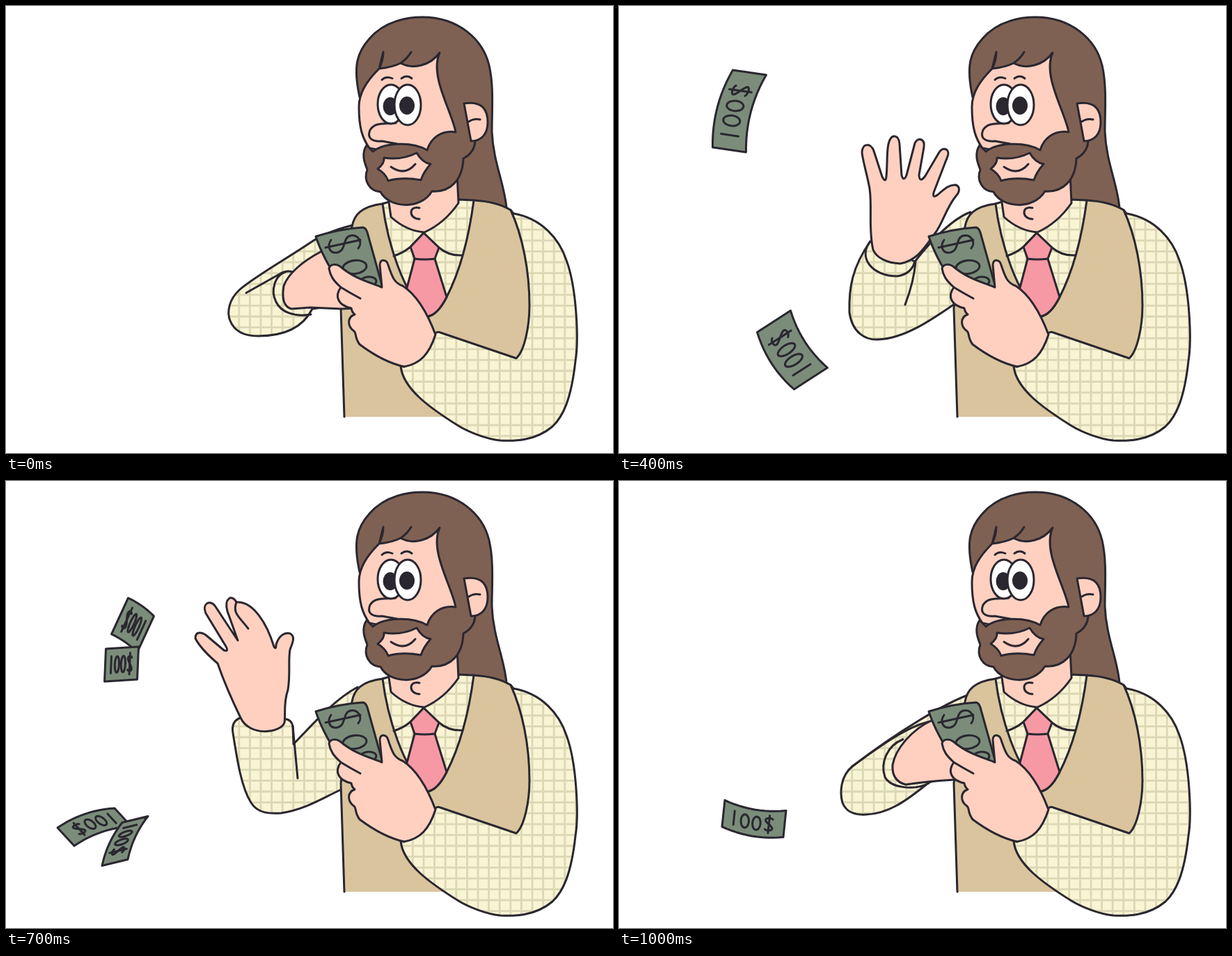
These frames come from a looping animation (872x642 px, 1.1 s). An HTML page with a canvas:

```html
<!DOCTYPE html>
<html lang="en">
<head>
<meta charset="utf-8">
<title>Throwing cash</title>
<style>
html, body { margin: 0; width: 100%; height: 100%; overflow: hidden; background: #fff; }
canvas { display: block; }
</style>
</head>
<body>
<canvas id="stage" width="872" height="642"></canvas>
<script>
const ctx = document.getElementById('stage').getContext('2d');
const INK = '#2a2730', SKIN = '#ffd0c0', HAIR = '#7f6153', VEST = '#d9c49d',
      SHIRT = '#f9f4d4', CHECK = '#dcd7b4', TIE = '#f799a4', CASH = '#7b8d7a';
const STEP = 100, STEPS = 11;

function fill(d, color) {
  ctx.fillStyle = color;
  ctx.fill(new Path2D(d));
}

function line(d, width = 3) {
  ctx.strokeStyle = INK;
  ctx.lineWidth = width;
  ctx.stroke(new Path2D(d));
}

function shape(d, color) {
  fill(d, color);
  line(d);
}

function oval(x, y, rx, ry, color, turn = 0) {
  ctx.beginPath();
  ctx.ellipse(x, y, rx, ry, turn, 0, 7);
  if (color) {
    ctx.fillStyle = color;
    ctx.fill();
  }
  ctx.strokeStyle = INK;
  ctx.lineWidth = 3;
  ctx.stroke();
}

// Checked shirt cloth
function cloth(d) {
  fill(d, SHIRT);
  ctx.save();
  ctx.clip(new Path2D(d));
  ctx.beginPath();
  for (let k = 0; k < 36; k++) {
    const x = 288 + 15.6 * k, y = 274.4 + 15.6 * k;
    ctx.moveTo(x, 260);
    ctx.lineTo(x, 642);
    ctx.moveTo(280, y);
    ctx.lineTo(840, y);
  }
  ctx.strokeStyle = CHECK;
  ctx.lineWidth = 2.8;
  ctx.stroke();
  ctx.restore();
  line(d);
}

function sample(n, point) {
  return Array.from({ length: n + 1 }, (_, i) => point(i / n));
}

// Flying note: centre, reading vector, downward vector, bend and taper
function note([cx, cy, ux, uy, vx, vy, bend = 0, taper = 0]) {
  const len = Math.hypot(ux, uy);
  const at = ([u, v]) => {
    const a = u - 0.5, b = (v - 0.5) * (1 - taper * u);
    const k = bend * (1 - 4 * a * a) / len;
    return [cx + a * ux + b * vx - uy * k, cy + a * uy + b * vy + ux * k];
  };
  const trace = points => 'M' + points.map(at).join('L');
  const edge = [...sample(12, t => [t, 0]), ...sample(12, t => [1 - t, 1])];
  shape(trace(edge) + 'Z', CASH);
  line(trace([[.18, .24], [.18, .76]]));
  for (const u of [.36, .55]) {
    line(trace(sample(18, t => [u + .065 * Math.cos(t * 2 * Math.PI), .5 + .25 * Math.sin(t * 2 * Math.PI)])));
  }
  line(trace(sample(20, t => {
    const a = (t - 0.5) * 4.4;
    return [.75 + .06 * Math.sin(2 * a), .5 + .23 * Math.sin(a)];
  })));
  line(trace([[.75, .17], [.75, .83]]));
}

// Note held upright in a hand
function heldNote() {
  shape('M445 331Q480 320 513 318Q517 319 519 325L541 404L482 402Q455 362 445 331Z', CASH);
  line('M467 336C460 346 466 356 476 354C489 351 483 334 494 330C506 327 513 340 506 348M459 347L509 336');
  oval(501, 375, 17, 9.5, null, -.12);
  oval(520, 396, 12, 7, null, -.12);
}

const reach = {
  sleeve: 'M497 315C470 322 452 330 440 338C400 365 355 390 335 408C320 422 317 440 322 452C330 472 350 474 362 474C395 474 425 465 440 435L490 428Z',
  folds: 'M345 412L393 385Q403 379 412 382M405 381C385 385 380 410 388 425C395 440 415 447 438 443',
  hand: 'M454 352C425 367 405 385 399 402C396 420 399 432 410 435L437 433Q460 434 482 435L502 434L502 350Z'
};
const back = {
  sleeve: 'M505 306C470 318 400 360 335 410C318 424 317 448 321 462C327 477 340 480 355 479C385 478 410 462 445 433L490 420Z',
  folds: 'M335 410C385 373 420 350 449 345M408 371C385 380 375 405 382 425C390 441 425 445 445 434',
  hand: 'M451 343C420 357 397 385 393 408C392 425 400 433 412 436Q445 431 482 429L502 428L502 345Z'
};
const draw = {
  sleeve: 'M413 352C375 368 330 405 324 430C320 455 340 467 360 467C400 467 450 438 481 430L500 400L500 330L470 330Z',
  folds: 'M402 356C402 382 415 405 449 397M451 396Q432 424 408 443',
  hand: 'M442 317C418 335 403 360 415 380C430 395 455 395 475 392L500 392L523 333C538 329 538 312 526 313L512 317L509 310C522 306 522 294 512 293L500 297Z'
};
const open = {
  sleeve: 'M505 296C480 305 450 335 425 367L361 338C335 375 330 405 331 440C335 470 355 480 372 479C410 478 450 450 482 428L500 420Z',
  folds: 'M361 338C343 360 362 388 400 388Q420 385 425 367M426 367Q424 395 411 429',
  hand: 'M365 350C358 320 364 290 360 262C356 240 350 222 349 210C350 196 362 197 366 208L378 245Q383 255 384 245C386 225 384 205 388 195C392 183 402 185 403 198L406 243Q409 253 413 243L425 197C429 188 440 190 438 203L431 243Q432 255 440 244L460 210C466 201 476 206 472 216L452 268Q450 277 458 271C468 262 475 256 484 257C491 260 489 268 484 273C470 290 465 312 455 325C440 345 430 365 404 370C385 369 370 362 365 350Z'
};
const lower = {
  ...open,
  folds: 'M361 342C344 362 370 379 400 379Q420 378 425 368M426 368Q424 395 411 430'
};
const wave = {
  sleeve: 'M505 296C470 312 440 345 421 372L417 350L352 336C340 345 338 370 340 390C344 420 347 450 352 463C358 478 370 478 385 477C420 475 450 458 482 441L500 430Z',
  folds: 'M417 350Q422 360 421 375L418 432',
  hand: 'M355 335C345 310 340 280 339 257C336 240 324 220 321 210C320 198 330 194 337 204L352 243Q359 250 358 240L351 187C350 170 364 167 367 180L380 230Q385 238 386 228L385 185C388 173 398 172 402 182C415 200 423 225 428 243Q429 252 437 246C445 238 452 237 457 238C463 242 459 252 454 258C447 270 447 290 445 305C438 330 420 350 414 365C400 375 375 378 355 335Z',
  finger: 'M404 242L403 215C400 200 396 192 401 183'
};
const fling = {
  sleeve: 'M505 296C470 315 440 350 413 378L412 352Q410 343 402 342L337 340Q323 345 326 362C332 400 338 440 352 462C362 478 380 478 395 477C430 472 455 455 482 443L500 430Z',
  folds: 'M412 352L419 427',
  hand: 'M337 340C320 305 312 285 304 262C290 250 278 238 272 226C272 214 283 218 288 222L313 243Q321 246 315 236L287 190C281 176 293 170 300 179L333 229L318 187C313 168 325 162 331 174C355 172 375 205 385 238Q388 243 388 235C392 222 400 217 408 219C416 223 412 232 408 242C405 260 409 275 405 300C398 320 402 335 400 347C395 362 350 368 337 340Z',
  finger: 'M331 174C325 190 335 195 348 212'
};

// Each step: arm pose, arm shift, notes in the air
const steps = [
  { arm: reach },
  { arm: draw, shift: [18, 14], pulls: true },
  { arm: draw, pulls: true },
  { arm: open, shift: [10, -3], notes: [
    [262, 190, 45, -95, 44, 20, -6], [318, 440, -70, -60, 34, -42, -5]] },
  { arm: open, notes: [
    [173, 151, 29, -111, 48, 7, -8], [249, 494, -53, -82, 48, -31, -7]] },
  { arm: wave, notes: [
    [127, 153, 10, 105, -20, -23, 8, .95], [80, 248, 53, 31, -39, 20, -2],
    [144, 505, -48, 62, -46, -7, 4]] },
  { arm: fling, shift: [22, 2], notes: [
    [145, 160, 20, 70, -35, -10, 5], [110, 258, 60, 10, -12, 40, -3],
    [116, 504, -72, 40, -32, -16, 3]] },
  { arm: fling, notes: [
    [182, 207, -37, -26, 24, -52, 2], [166, 263, 47, -3, -2, 47],
    [127, 497, -82, 28, -24, -26, 6], [171, 517, -29, 62, -37, 9, 4]] },
  { arm: lower, shift: [1, 0], notes: [
    [204, 307, 55, -72, 36, 22, 9], [106, 358, 31, 62, -28, 17, 8],
    [113, 548, 25, 49, -29, 3, 6], [187, 547, 46, -48, 21, 20, 7]] },
  { arm: draw, shift: [12, 14], notes: [
    [212, 398, 70, -30, 15, 36, 5], [125, 440, 60, 50, -20, 24, 5],
    [160, 552, 60, -10, 5, 22, 4]] },
  { arm: back, notes: [[194, 485, 88, 15, -4, 38, 6]] }
];

function head() {
  shape('M508 131C498 85 505 66 522 47C545 20 580 16 598 16C650 16 685 48 694 85C701 115 698 150 698 180C700 225 716 255 719 290L640 290L600 180Z', HAIR);
  shape('M542 66Q542 78 536 90C518 108 507 125 507 145C507 175 512 190 522 204L600 220L646 181C640 150 608 100 623 67C610 85 585 92 567 82Q555 88 536 90Z', SKIN);
  line('M582 66Q577 75 567 82M540 106Q546 100 555 104M568 104Q576 98 583 104');
  fill('M560 168C545 170 530 166 523 178C518 190 526 195 540 194L562 198Z', SKIN);
  line('M560 168C545 170 530 166 523 178C518 190 526 195 540 194L562 198');
  oval(553, 141, 19, 28, '#fff');
  oval(552, 144, 9, 11.5, INK);
  oval(577, 142, 19, 29, '#fff');
  oval(576, 143, 9.5, 11.5, INK);
}

function beard() {
  const edge = 'M646 181C625 178 610 190 605 207C585 195 545 195 527 209L518 200C510 212 515 225 519 235C513 250 522 266 538 267C550 290 595 294 612 266C638 268 656 250 657 219C670 212 674 203 674 192';
  fill(edge + 'L658 150Z', HAIR);
  line(edge);
  shape('M543 218Q568 222 590 211Q598 225 610 227Q600 238 596 250Q570 245 549 251Q545 240 534 234Q544 226 543 218Z', SKIN);
  line('M553 231Q573 245 588 227');
  shape('M658 140C685 136 692 150 692 167C692 185 682 194 668 194Z', SKIN);
  line('M665 166Q672 161 681 163');
}

function torso() {
  const side = 'M541 284C510 288 500 300 497 317L481 434L486 590';
  fill(side + 'L650 590L733 506C745 495 752 460 752 430C752 380 742 330 725 293Q705 281 672 279Z', VEST);
  line(side);
  cloth('M541 284L551 281L650 278L672 279C664 340 650 385 633 418Q620 444 605 446C570 410 548 340 541 284Z');
  line('M672 279Q705 281 725 293');
  shape('M548 268L553 303Q575 323 601 325Q630 312 650 283L648 240Z', SKIN);
  line('M594 290C578 286 578 306 594 306');
  line('M557 359Q570 355 581 346L600 326L622 347Q636 359 655 358');
  shape('M587 363L574 412Q590 446 605 446Q620 444 633 418L616 363Z', TIE);
  shape('M600 326L581 346L587 363Q601 365 616 363L622 347Z', TIE);
}

function frontArm() {
  cloth('M725 293L729 298C770 305 795 335 805 365C820 405 823 480 818 510C812 565 800 590 785 604C760 625 730 625 710 624C690 622 665 612 650 603C610 578 570 550 567 517L572 518L617 470Q620 467 624 469L733 506C745 495 752 460 752 430C752 380 742 330 725 293Z');
  shape('M464 377C466 370 474 370 480 374C500 391 520 396 540 404L537 372C537 362 547 364 549 372C555 390 558 398 570 402C590 415 605 440 617 472C608 500 595 514 572 518C545 512 520 495 508 486C500 475 504 470 500 467C490 460 490 447 501 443Q497 440 496 434C478 430 471 418 481 404C470 394 466 388 464 377Z', SKIN);
  line('M481 404Q494 412 509 420');
}

function shifted([x, y], paint) {
  ctx.save();
  ctx.translate(x, y);
  paint();
  ctx.restore();
}

function scene({ arm, shift = [0, 0], notes = [], pulls }) {
  ctx.fillStyle = '#fff';
  ctx.fillRect(0, 0, 872, 642);
  notes.forEach(note);
  shifted(shift, () => {
    cloth(arm.sleeve);
    line(arm.folds);
  });
  head();
  torso();
  beard();
  shifted(shift, () => {
    shape(arm.hand, SKIN);
    if (arm.finger) line(arm.finger);
    if (pulls) shifted([-17, -55], heldNote);
  });
  heldNote();
  frontArm();
}

ctx.lineCap = ctx.lineJoin = 'round';

function play() {
  scene(steps[Math.floor(performance.now() / STEP) % STEPS]);
  requestAnimationFrame(play);
}
play();
</script>
</body>
</html>
```
